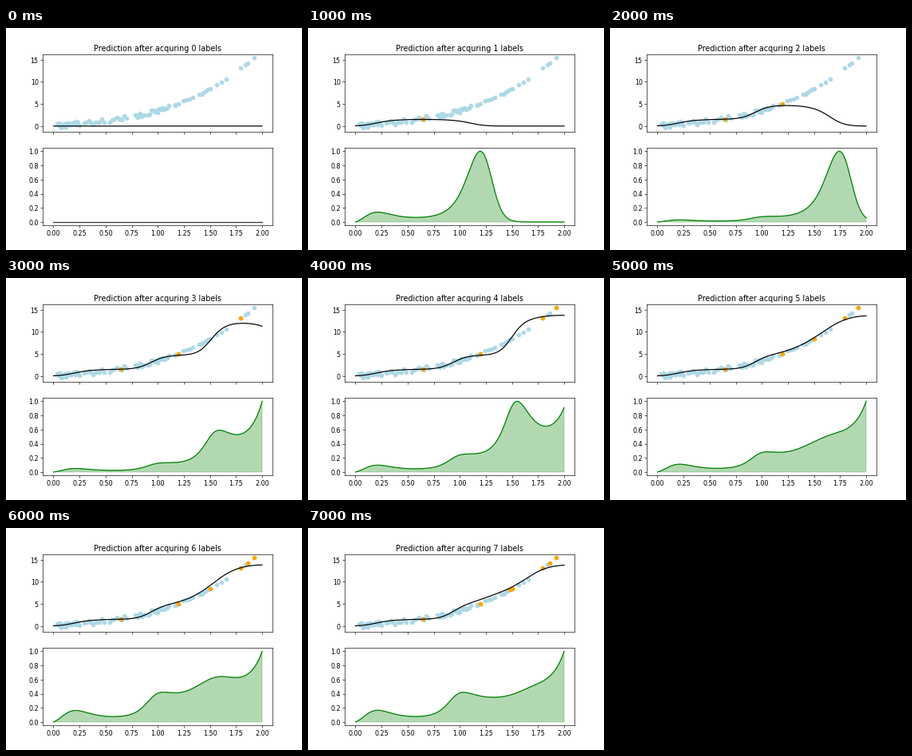
Write a matplotlib script that moves like this. It is 371 px wide and 278 px high and loops after 8 s.

```python
import numpy as np
import matplotlib.pyplot as plt
from matplotlib.animation import FuncAnimation

plt.rcParams["font.family"] = "DejaVu Sans"

# Start, end and number of points of each cluster along x.
CLUSTERS = [(.035, .245, 19), (.295, .485, 10), (.54, .7, 8), (.785, .865, 8),
            (.905, 1.105, 14), (1.165, 1.17, 2), (1.245, 1.335, 4),
            (1.395, 1.455, 4), (1.565, 1.655, 3), (1.84, 1.84, 1)]
# Where labels are acquired, in order.
ACQUIRED = np.array([.65, 1.2, 1.795, 1.92, 1.505, 1.86, 1.482])

SHARPNESS = 13.5   # kernel decay
PRIOR = .09        # pull of the prediction towards zero
FLOOR = .005       # keeps the score finite far from all labels

rng = np.random.default_rng(4)
grid = np.linspace(0, 2, 1000)


def trend(x):
    return 1.7 * x ** 3 + 1.8 * x


def make_pool():
    """Noisy samples of the trend; the noise fades for large x."""
    x = np.concatenate([np.linspace(*c) for c in CLUSTERS])
    spread = .1 + .5 / (1 + (x / 1.1) ** 12)
    return x, trend(x) + rng.uniform(-1, 1, len(x)) * spread


def evaluate(labels):
    """Kernel prediction and its normalised acquisition score."""
    k = np.exp(-SHARPNESS * (grid[:, None] - labels) ** 2)
    density = k.sum(axis=1)
    mean = k @ trend(labels) / (density + PRIOR)
    score = grid * mean / (density + FLOOR)
    return mean, score / (score.max() or 1)


fig, (top, bottom) = plt.subplots(2, 1, sharex=True, figsize=(6.4, 4.8), dpi=58)
top.set(xlim=(-.1, 2.1), ylim=(-1.38, 16.22), yticks=[0, 5, 10, 15])
bottom.set(ylim=(-.05, 1.05), yticks=np.linspace(0, 1, 6),
           xticks=np.linspace(0, 2, 9))

top.scatter(*make_pool(), color="lightblue")
top.scatter(ACQUIRED, trend(ACQUIRED), color="lightblue")
chosen = top.scatter([], [], color="orange")
mean_line, = top.plot(grid, 0 * grid, color="black", snap=False)
area, = bottom.fill([0, 2, 2], [0, 0, 0], color="green", alpha=.3, lw=1)
score_line, = bottom.plot(grid, 0 * grid)
title = top.set_title("")


def draw(count):
    labels = ACQUIRED[:count]
    mean, score = evaluate(labels)
    title.set_text(f"Prediction after acquring {count} labels")
    chosen.set_offsets(np.column_stack([labels, trend(labels)]))
    mean_line.set_ydata(mean)
    area.set_xy(np.vstack([(0, 0), np.column_stack([grid, score]), (2, 0)]))
    score_line.set_ydata(score)
    score_line.set_color("green" if count else "#333333")
    return title, chosen, mean_line, area, score_line


anim = FuncAnimation(fig, draw, frames=len(ACQUIRED) + 1, interval=1000,
                     repeat=True, repeat_delay=0)
plt.show()
```
